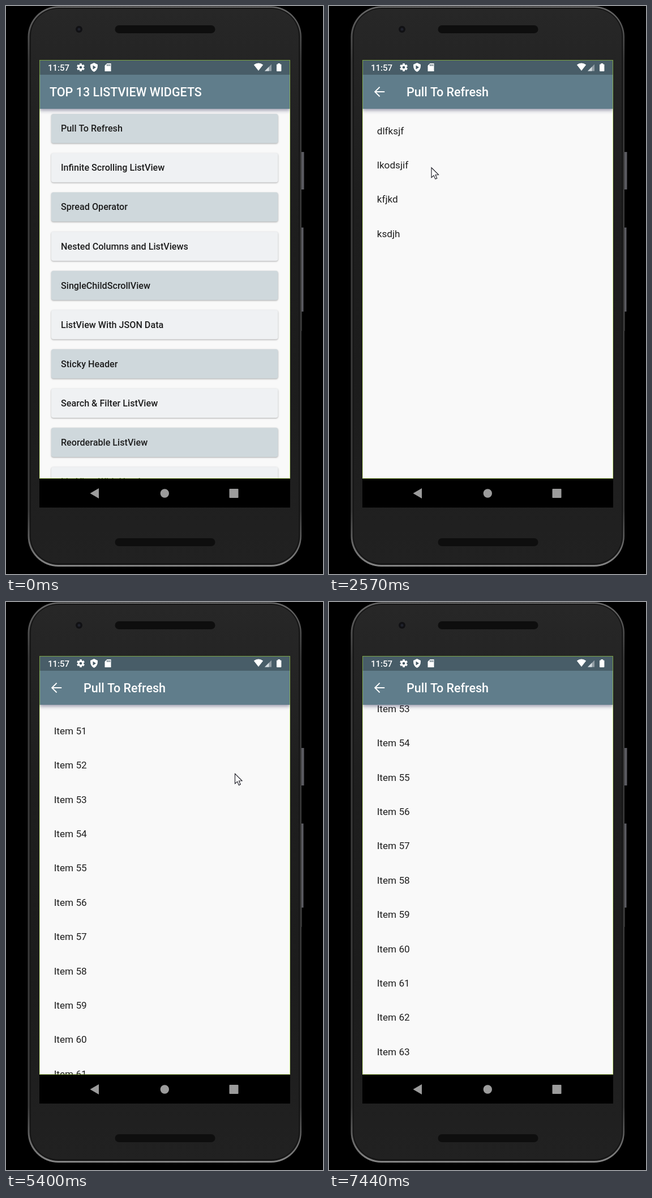
Write an HTML page with a canvas that moves like this. It is 560x1000 px and loops after 7480 ms.

```html
<!DOCTYPE html>
<html lang="en">
<head>
<meta charset="utf-8">
<title>ListView widgets</title>
<style>
  html, body { margin: 0; width: 100%; height: 100%; overflow: hidden; background: #000; }
  canvas { display: block; width: 560px; height: 1000px; }
</style>
</head>
<body>
<canvas id="stage" width="560" height="1000"></canvas>
<script>
const ctx = document.getElementById('stage').getContext('2d');
const LOOP = 7480;
const SCREEN = { x: 59, y: 95, w: 443, h: 737 };
const MIDDLE = 280.3, BAR_END = 181, CARD_STEP = 69.06, ROW_STEP = 60.4;
const FONT = 'Roboto, "Noto Sans", sans-serif';
const SLATE = '#607d8b', STATUS = '#485d68', PAPER = '#f9f9f9';

const MENU = ['Pull To Refresh', 'Infinite Scrolling ListView', 'Spread Operator',
  'Nested Columns and ListViews', 'SingleChildScrollView', 'ListView With JSON Data',
  'Sticky Header', 'Search & Filter ListView', 'Reorderable ListView', 'ListView With Header'];
const FIRST_ROWS = ['dlfksjf', 'lkodsjif', 'kfjkd', 'ksdjh'];

const OPEN = 2200, PULL = 2700, RELEASE = 3420, LOADED = 3950, FLING_TIME = 1080;
const PULL_TOP = 290, PULL_LENGTH = 243;

// Every fling slows down the same way; only start and distance differ
const FLINGS = [
  { at: 4408, by: 1718 },
  { at: 4920, by: 1635 },
  { at: 6200, by: -120 }];

// Pointer moves, each going on from where the one before stopped
const ENTRY = { x: 575, y: 330 };
const MOVES = [
  { from: 1400, to: 1980, x: 291, y: 231 },
  { from: 2250, to: 2650, x: 168, y: PULL_TOP },
  { from: PULL, to: 3300, x: 148, y: 801 },
  { from: 3900, to: 4400, x: 335, y: 760 },
  { from: 4408, to: 4670, x: 353, y: 6 },
  { from: 4720, to: 4910, x: 388, y: 700 },
  { from: 4920, to: 5150, x: 405, y: 152 },
  { from: 5150, to: 5800, x: 402, y: 603 },
  { from: 6200, to: 6860, x: 575, y: 640 }];

const clamp = (v, a = 0, b = 1) => Math.min(b, Math.max(a, v));
const progress = (t, from, to) => clamp((t - from) / (to - from));
const easeOut = p => 1 - (1 - p) ** 3;
const smooth = p => p * p * (3 - 2 * p);

const pointerAt = t => MOVES.reduce((spot, m) => {
  const p = smooth(progress(t, m.from, m.to));
  return { x: spot.x + (m.x - spot.x) * p, y: spot.y + (m.y - spot.y) * p };
}, ENTRY);

const scrollAt = t => FLINGS.reduce(
  (sum, f) => sum + f.by * easeOut(progress(t, f.at, f.at + FLING_TIME)), 0);

const pullAt = t => t < PULL ? 0 : clamp((pointerAt(t).y - PULL_TOP) / PULL_LENGTH);

function box(x, y, w, h, r, fill) {
  ctx.beginPath();
  ctx.roundRect(x, y, w, h, r);
  ctx.fillStyle = fill;
  ctx.fill();
}

function disc(x, y, r, fill) {
  ctx.beginPath();
  ctx.arc(x, y, r, 0, 7);
  ctx.fillStyle = fill;
  ctx.fill();
}

function poly(points, fill) {
  ctx.beginPath();
  points.forEach(([x, y]) => ctx.lineTo(x, y));
  ctx.closePath();
  ctx.fillStyle = fill;
  ctx.fill();
}

// y is the middle of the capitals
function text(s, x, y, size, weight, color) {
  ctx.font = `${weight} ${size}px ${FONT}`;
  ctx.fillStyle = color;
  ctx.fillText(s, x, y + size * 0.356);
}

function shadow(color, blur, dy) {
  ctx.shadowColor = color;
  ctx.shadowBlur = blur;
  ctx.shadowOffsetY = dy;
}
const noShadow = () => shadow('transparent', 0, 0);

function vertical(y0, y1, ...colors) {
  const g = ctx.createLinearGradient(0, y0, 0, y1);
  colors.forEach((c, i) => g.addColorStop(i / (colors.length - 1), c));
  return g;
}

function phone() {
  ctx.fillStyle = '#000';
  ctx.fillRect(0, 0, 560, 1000);
  ctx.fillStyle = '#5a5a60';
  ctx.fillRect(522, 257, 4.5, 66);
  ctx.fillRect(522, 390, 3.5, 148);
  ctx.fillStyle = '#2c2c2c';
  ctx.fillRect(521, 538, 2, 34);

  // rim, brightest round the corners
  const side = Array(9).fill('#3a3a3a');
  box(38.5, 0.5, 483.5, 986.5, 54, vertical(0, 987, '#686868', ...side, '#858585'));
  box(41.5, 3, 478, 981, 51, '#161616');
  box(44, 5, 473, 976, 48, vertical(5, 981, '#272727', '#1e1e1e', '#1c1c1c', '#212121'));

  disc(129, 41, 6, '#111114');
  disc(129, 41, 2.5, '#20222c');
  for (const y of [34, 937]) box(192.5, y, 177, 14, 7, '#0e0e0e');

  ctx.fillStyle = '#000';
  ctx.fillRect(SCREEN.x, SCREEN.y, SCREEN.w, 788);
  poly([[148.5, 858], [164, 849], [164, 867]], '#9c9c9c');
  disc(MIDDLE, 858, 7.7, '#9c9c9c');
  box(394.5, 850, 16, 16, 1, '#9c9c9c');
}

function gear(x, y) {
  ctx.save();
  ctx.translate(x, y);
  for (let i = 0; i < 6; i++) {
    ctx.rotate(Math.PI / 3);
    box(-1.9, -7, 3.8, 5, 0.8, '#fff');
  }
  disc(0, 0, 5.2, '#fff');
  disc(0, 0, 2.3, STATUS);
  ctx.restore();
}

function shield(x, y) {
  ctx.beginPath();
  ctx.moveTo(x, y - 8);
  ctx.lineTo(x + 6.5, y - 5);
  ctx.quadraticCurveTo(x + 7, y + 5, x, y + 8);
  ctx.quadraticCurveTo(x - 7, y + 5, x - 6.5, y - 5);
  ctx.fillStyle = '#fff';
  ctx.fill();
  poly([[x - 2, y - 3.5], [x + 3.5, y], [x - 2, y + 3.5]], STATUS);
}

function memoryCard(x, y) {
  poly([[x - 1.5, y - 7], [x + 5.5, y - 7], [x + 5.5, y + 7], [x - 5.5, y + 7], [x - 5.5, y - 3]], '#fff');
  ctx.fillStyle = STATUS;
  for (let i = 0; i < 3; i++) ctx.fillRect(x - 2 + i * 2.4, y - 5.4, 1.3, 3);
}

function statusBar() {
  ctx.fillStyle = STATUS;
  ctx.fillRect(SCREEN.x, SCREEN.y, SCREEN.w, 26);
  text('11:57', 74, 108.3, 15, 500, '#fff');
  gear(132, 108);
  shield(155.5, 108);
  memoryCard(180, 108);

  // wifi, signal, battery
  ctx.beginPath();
  ctx.moveTo(446, 114);
  ctx.lineTo(437.8, 103.6);
  ctx.quadraticCurveTo(446, 97.6, 454.2, 103.6);
  ctx.fillStyle = '#fff';
  ctx.fill();
  const signal = (size, fill) =>
    poly([[457, 114.5], [457 + size, 114.5 - size], [457 + size, 114.5]], fill);
  signal(12, 'rgba(255,255,255,.4)');
  signal(7.5, '#d5dde1');
  box(478, 102.5, 8.4, 12.5, 1, '#fff');
  ctx.fillRect(480.3, 101, 3.8, 2);
}

function appBar(title, x) {
  shadow('rgba(40,40,80,.5)', 7, 2.5);
  ctx.fillStyle = SLATE;
  ctx.fillRect(SCREEN.x, SCREEN.y, SCREEN.w, BAR_END - SCREEN.y);
  noShadow();
  text(title, x, 151.7, 21.5, 500, '#fff');
}

function paper() {
  ctx.fillStyle = PAPER;
  ctx.fillRect(SCREEN.x, SCREEN.y, SCREEN.w, SCREEN.h);
}

function menuPage() {
  paper();
  MENU.forEach((label, i) => {
    const y = 190 + i * CARD_STEP;
    shadow('rgba(0,0,0,.32)', 2.5, 1);
    box(80, y, 400.5, 51.5, 4, i % 2 ? '#eff1f3' : '#cfd8dc');
    noShadow();
    text(label, 97, y + 25.6, 16.15, 500, '#1d1d1d');
  });
  appBar('TOP 13 LISTVIEW WIDGETS', 77);
}

function listRows(t) {
  const row = (label, i, offset) =>
    text(label, 84.7, 219.5 + i * ROW_STEP - offset, 17.2, 400, '#1e1e1e');
  if (t < LOADED) {
    FIRST_ROWS.forEach((label, i) => row(label, i, 0));
    return;
  }
  const offset = scrollAt(t);
  const first = Math.max(0, Math.floor(offset / ROW_STEP) - 1);
  for (let i = first; i < first + 14; i++) row('Item ' + i, i, offset);
}

function overscrollGlow(t) {
  const strength = pullAt(t) * (1 - progress(t, RELEASE, RELEASE + 300));
  if (t > LOADED || !strength) return;
  ctx.beginPath();
  ctx.ellipse(MIDDLE, BAR_END, SCREEN.w * 0.75, 46 * strength, 0, 0, Math.PI);
  ctx.fillStyle = `rgba(96,125,139,${0.05 * strength})`;
  ctx.fill();
}

function spinner(t) {
  if (t < PULL || t > LOADED + 200) return;
  const busy = t > RELEASE;
  const pull = busy ? 1 : pullAt(t);
  const settle = easeOut(progress(t, RELEASE, RELEASE + 150));
  const scale = 1 - progress(t, LOADED, LOADED + 200);
  const shown = clamp(pull * 1.5);
  const turn = Math.max(0, t - RELEASE) / 1333;
  const end = 2.35 - (1 - pull) * 4 + turn * 8;
  const sweep = busy ? 2.9 + 1.81 * Math.cos(turn * Math.PI * 2) : 4.71 * shown;

  ctx.save();
  ctx.translate(MIDDLE, 159 + 140 * pull - 56 * settle);
  ctx.scale(scale, scale);
  shadow('rgba(0,0,0,.35)', 5, 2);
  disc(0, 0, 21.3, '#fafafa');
  noShadow();
  ctx.globalAlpha *= shown;
  ctx.strokeStyle = '#557382';
  ctx.lineWidth = 2.6;
  ctx.beginPath();
  ctx.arc(0, 0, 9.4, end - sweep, end);
  ctx.stroke();
  if (!busy) {
    ctx.rotate(end);
    poly([[5.2, -0.5], [13.6, -0.5], [9.4, 4.8]], '#557382');
  }
  ctx.restore();
}

function backArrow(x, y) {
  ctx.strokeStyle = '#fff';
  ctx.lineWidth = 2;
  ctx.beginPath();
  ctx.moveTo(x + 17, y);
  ctx.lineTo(x + 1, y);
  ctx.moveTo(x + 8.4, y - 8.4);
  ctx.lineTo(x, y);
  ctx.lineTo(x + 8.4, y + 8.4);
  ctx.stroke();
}

function detailPage(t) {
  const p = progress(t, OPEN, OPEN + 300);
  if (p === 0) return;
  ctx.save();
  ctx.globalAlpha = p * p;
  ctx.translate(0, (1 - easeOut(p)) * SCREEN.h / 4);
  paper();
  listRows(t);
  overscrollGlow(t);
  spinner(t);
  appBar('Pull To Refresh', 137);
  backArrow(81.2, 151);
  ctx.restore();
}

function pointer(t) {
  const { x, y } = pointerAt(t);
  ctx.save();
  ctx.translate(x, y);
  poly([[0.5, 0.5], [0.5, 18], [4.6, 14.3], [7.4, 20.6], [10.2, 19.4], [7.5, 13.2], [13, 13]], '#fff');
  ctx.strokeStyle = '#16161f';
  ctx.lineWidth = 1.1;
  ctx.stroke();
  ctx.restore();
}

function draw(t) {
  phone();
  ctx.save();
  ctx.beginPath();
  ctx.rect(SCREEN.x, SCREEN.y, SCREEN.w, SCREEN.h);
  ctx.clip();
  if (t < OPEN + 300) menuPage();
  detailPage(t);
  statusBar();
  ctx.restore();
  ctx.strokeStyle = 'rgba(165,220,40,.55)';
  ctx.lineWidth = 1;
  ctx.strokeRect(SCREEN.x + 0.5, SCREEN.y + 0.5, SCREEN.w - 1, SCREEN.h - 1);
  pointer(t);
}

const start = performance.now();
function tick() {
  draw((performance.now() - start) % LOOP);
  requestAnimationFrame(tick);
}
tick();
</script>
</body>
</html>
```
